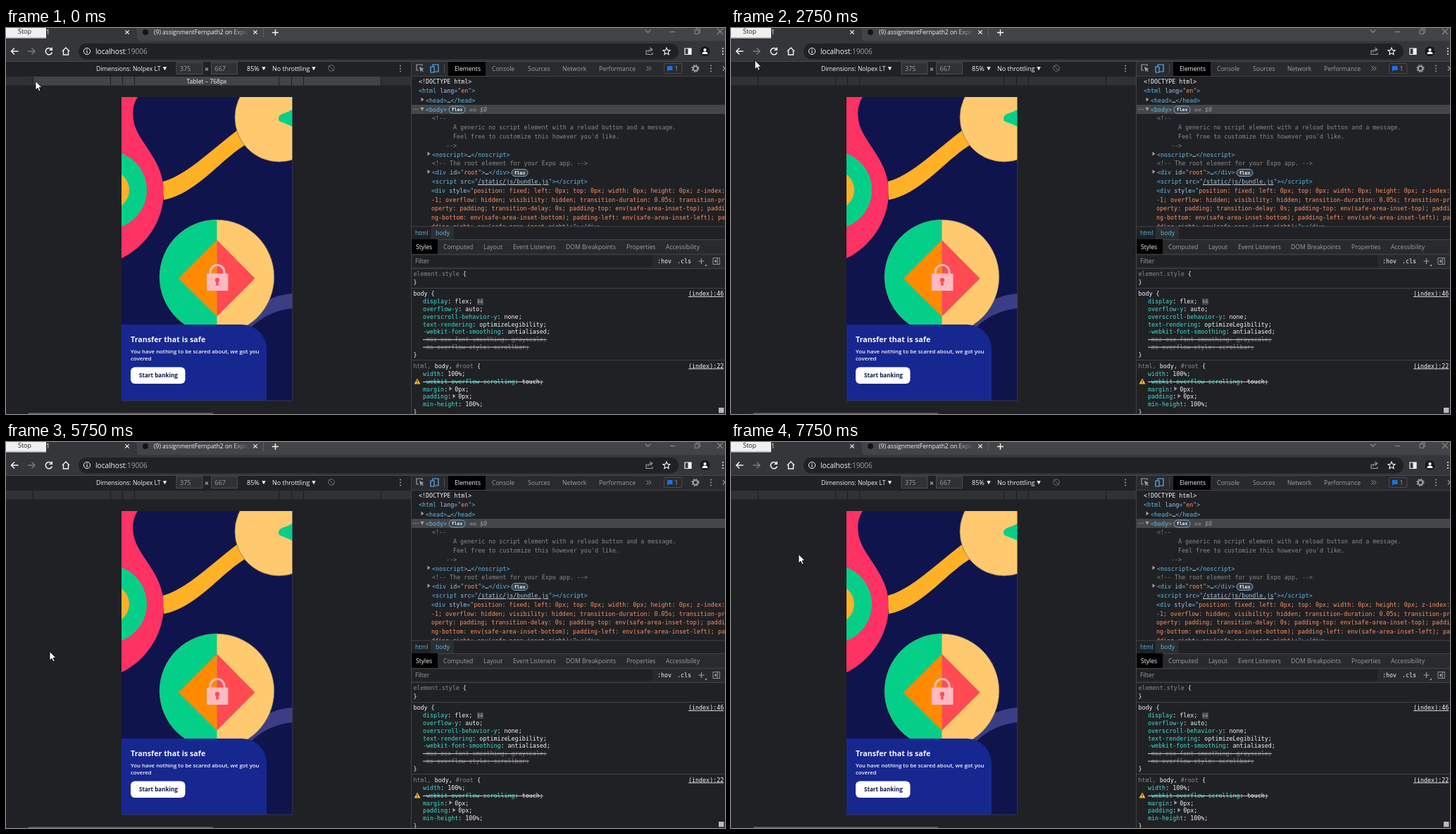
An HTML page for the animation above (8000 ms loop, 1021 by 548 pixels).

```html
<!DOCTYPE html>
<html lang="en">
<head>
<meta charset="utf-8">
<title>Device preview</title>
<style>
html, body { margin: 0; width: 100%; height: 100%; overflow: hidden; background: #202124; }
svg { display: block; width: 1021px; height: 548px; }
text { white-space: pre; font-family: "Open Sans", "Noto Sans", sans-serif; }
text.m { font-family: "DejaVu Sans Mono", monospace; }
</style>
</head>
<body>
<svg id="stage" viewBox="0 0 1021 548"></svg>
<script>
const out = [];
const ink = {
  w: '#f4f5f7', g: '#9aa0a6', t: '#5fb8e6', a: '#9bc4ec', v: '#fb8f5f',
  c: '#898989', p: '#3fdcd4', d: '#777777', b: '#10144d', k: '#202124'
};
const strip = '#434448';
const esc = s => s.replace(/&/g, '&amp;').replace(/\x3c/g, '&lt;');
const add = s => out.push(s);
const rect = (x, y, w, h, fill, extra = '') =>
  add(`<rect x="${x}" y="${y}" width="${w}" height="${h}" fill="${fill}" ${extra}/>`);
const disc = (x, y, r, fill, extra = '') =>
  add(`<circle cx="${x}" cy="${y}" r="${r}" fill="${fill}" ${extra}/>`);
const shape = (d, fill, extra = '') => add(`<path d="${d}" fill="${fill}" ${extra}/>`);
const line = (d, color = ink.w, w = 1.2, extra = '') =>
  shape(d, 'none', `stroke="${color}" stroke-width="${w}" ${extra}`);

// "~x" inside a string switches to colour x
function rich(x, y, s, size, extra) {
  const parts = s.split(/~(\w)/);
  let body = esc(parts[0]);
  for (let i = 1; i < parts.length; i += 2)
    body += `<tspan fill="${ink[parts[i]]}">${esc(parts[i + 1])}</tspan>`;
  add(`<text x="${x}" y="${y}" font-size="${size}" fill="${ink.w}" ${extra}>${body}</text>`);
}
const ui = (x, y, s, size = 8.6, extra = '') => rich(x, y, s, size, extra);
const code = (x, y, s, extra = '') => rich(x, y + 3, s, 8.36, 'class="m" ' + extra);
const arrowDown = (x, y, c = ink.w, r = 2.7) => shape(`M${x - r} ${y - r * .8}h${2 * r}l${-r} ${r * 1.8}z`, c);
const arrowRight = (x, y) => shape(`M${x - 1.5} ${y - 3}l4 3l-4 3z`, ink.g);
const dots = (x, y, c = ink.w) => [-4, 0, 4].forEach(d => disc(x, y + d, 1, c));
const cross = (x, y, r, c) => line(`M${x - r} ${y - r}l${2 * r} ${2 * r}m0 ${-2 * r}l${-2 * r} ${2 * r}`, c);

function browserBar() {
  rect(0, 0, 1021, 19, strip);
  shape('M0 0H181Q186 0 186 5V13Q186 19 192 19H0z', '#35363a');
  rect(0, 18.5, 1021, 29, '#35363a');
  rect(0, 47, 1021, 1, '#48494c');
  ui(57, 9, '1', 9);
  rect(0, 0, 57, 14.5, '#f0f0f0');
  rect(0, 13.5, 57, 1, '#a0a0a0');
  ui(17, 8, '~kStop', 9);
  cross(172, 6, 2.7, ink.w);
  disc(198, 6, 4, '#11131c');
  ui(210, 9, '(9) assignmentFernpath2 on Expo', 8.5);
  rect(320, 0, 26, 14, 'url(#fade)');
  rect(343, 0, 5, 14, strip);
  cross(354, 6, 2.7, ink.w);
  rect(365, 0, 1, 13, '#5d5e62');
  line('M378 6.5h9M382.5 2v9', ink.w, 1.4);
  const dim = '#8a8b8e';
  line('M907.5 2.5l4 4l4-4', dim);
  line('M943 5.5h7', dim);
  line('M978 3h5.5v5.5h-5.5zM980 3v-2h5.5v5.5h-2', dim, 1);
  cross(1014, 5, 4, dim);

  line('M17.5 33h-10m4.5-4.5l-4.5 4.5l4.5 4.5', ink.w, 1.5);
  line('M31 33h10m-4.5-4.5l4.5 4.5l-4.5 4.5', '#7c7d80', 1.4);
  line('M64.5 30a4.7 4.7 0 1 0 1 4.5', ink.w, 1.5);
  shape('M66 27v5h-5z', ink.w);
  line('M80 33l5-5l5 5M81.5 32v6h7v-6', ink.w, 1.4);
  rect(103, 22, 852, 22.5, '#202124', 'id="omni" rx="11.2"');
  disc(115, 33, 4.6, 'none', `stroke="${ink.w}"`);
  line('M115 32.3v3.5M115 30v1.2');
  ui(127, 36.7, 'localhost~g:19006', 10.1);
  line('M911.5 32h-2.5v5.5h9v-2.5M911.5 34.5q1-4 5-4m-2-2.5l3.5 2.5l-3.5 2.7', ink.g, 1.1);
  line('M938 28l1.4 3.4l3.6.3l-2.7 2.4l.8 3.6l-3.1-1.9l-3.1 1.9l.8-3.6l-2.7-2.4l3.6-.3z', ink.w, 1.1);
  line('M964 29h9v8.5h-9z', ink.w, 1.2);
  rect(968.5, 29, 4.5, 8.5, ink.w);
  disc(992.5, 33, 7, '#18191c');
  disc(992.5, 31, 2.1, '#fff');
  shape('M988.5 37q0-3.5 4-3.5t4 3.5z', '#fff');
  dots(1018, 33);
}

function deviceBar() {
  rect(0, 48, 575, 500, '#202124');
  ui(128, 60.5, 'Dimensions: Nolpex LT');
  arrowDown(225.5, 57.5);
  for (const [x, s] of [[242, '375'], [291.5, '667']]) {
    rect(x, 49, 37, 16.5, '#303134', 'stroke="#56575a" stroke-width=".8"');
    ui(x + 5, 60.5, '~g' + s, 9);
  }
  cross(285, 58.5, 2, ink.g);
  ui(342, 60.5, '85%', 9);
  arrowDown(366, 57.5);
  ui(378, 60.5, 'No throttling', 9);
  arrowDown(437, 57.5);
  disc(462, 57, 4.3, 'none', 'stroke="#77797d" stroke-width=".9"');
  line('M458.5 53.5l7 7', '#77797d', .9);
  dots(560, 57.5, ink.g);

  rect(0, 69, 575, 12.5, '#303134');
  add('<g id="tablet">');
  rect(39, 69, 493, 12.5, '#434447');
  ui(285, 78.5, 'Tablet – 768px', 8.6, 'text-anchor="middle"');
  add('</g>');
  for (const x of [38, 148, 165, 182, 387, 405, 422, 532]) rect(x, 69, 1, 12.5, '#1b1c1e');
  rect(32, 546.5, 262, 1.5, '#67686b');
}

function phone() {
  add('<g clip-path="url(#screen)">');
  rect(164, 98, 243, 431, '#10144d');
  shape('M164 98H187C180 108 178 123 183 139C192 166 224 190 224 232C224 276 196 312 164 327z', '#ff3264');
  disc(144.4, 230, 55.6, '#04cf89');
  disc(147.5, 230, 27.5, '#ffb128');
  shape('M223 218C258 208 290 174 330 144L341 165C302 189 272 234 224 244z', '#ffb128');
  disc(388, 127, 63, '#ffca6f', 'stroke="#8d7658" stroke-width=".8"');
  shape('M407 115.5Q400 120 392 122Q387 124 387 128.5Q387 133 393 134L407 140z', '#04cf89');
  shape('M407 377C378 379 361 391 342 409V428L348 425C366 408 385 400 407 398z', '#3b3e85');
  disc(299.5, 353.5, 81.3, '#ffca6f', 'stroke="#6f6655" stroke-width=".8"');
  shape('M299.5 272.2a81.3 81.3 0 0 0 0 162.6z', '#04cf89');
  shape('M299.5 301V409.5L245 355.5z', '#ff8a00');
  shape('M299.5 301V409.5L353.5 355.5z', '#ff4b51');
  line('M290 350v-3.5a10 10 0 0 1 20 0v3.5', '#ffbac1', 3);
  rect(285, 348.5, 30.5, 24.5, '#ffbac1', 'rx="1.5"');
  disc(300, 358, 3.2, '#ff4b51');
  shape('M299 358h2l1 7.5h-4z', '#ff4b51');
  shape('M164 421H335A35 35 0 0 1 370 456V529H164z', '#172790');
  ui(177, 446, 'Transfer that is safe', 10.7, 'font-weight="700"');
  ui(177, 462, 'You have nothing to be scared about, we got you', 7.8, 'font-weight="600"');
  ui(177, 472.3, 'covered', 7.8, 'font-weight="600"');
  rect(177, 481.5, 77.5, 23.5, '#fff', 'rx="6"');
  ui(189, 496.2, '~bStart banking', 8.1, 'font-weight="700"');
  add('</g>');
  line('M406.7 98V529H164', '#3c3d55', .8);
}

function badge(x, y) {
  rect(x, y - 5, 23, 10, '#37434c', 'rx="5" stroke="#9dbbdb" stroke-width=".8"');
  rich(x + 11.5, y + 2.3, 'flex', 6.6, 'class="m" font-weight="700" text-anchor="middle"');
}

function elementsPanel() {
  rect(575, 48, 446, 500, '#202124');
  rect(576, 48, 445, 20, '#292a2d');
  rect(576, 68, 445, .8, '#494c50');
  line('M591 54v-2h-8v8h3', ink.g);
  shape('M587 55l6.5 3l-2.8 1l2 2.3l-1 1l-2-2.3l-1 2.5z', ink.g);
  line('M606 55v-3h8v10h-5M603 55h5v8h-5z', '#5ab3ff');
  rect(622, 51, .8, 13, '#55565a');
  rect(628, 48, 53, 20, '#000');
  [[637, '~wElements'], [690, 'Console'], [741, 'Sources'], [790, 'Network'], [842, 'Performance']]
    .forEach(([x, s]) => ui(x, 60.6, '~g' + s));
  line('M909.5 54.5l3 3l-3 3m3.5-6l3 3l-3 3', ink.g, 1);
  rect(934.5, 50.5, 25.5, 14, 'none', 'rx="2" stroke="#4a4b4f"');
  shape('M939 54h7.5v6h-5.5l-2 2z', '#1a73e8');
  ui(949.5, 60.6, '~g1');
  disc(979, 57.5, 3.2, 'none', `stroke="${ink.g}" stroke-width="2"`);
  disc(979, 57.5, 4.8, 'none', `stroke="${ink.g}" stroke-width="1.5" stroke-dasharray="2 1.77"`);
  dots(1001, 57.5, ink.g);
  cross(1021, 57.5, 3, ink.g);

  rect(576, 109, 445, 13, '#454648');
  code(586, 76, '\x3c!DOCTYPE html>');
  code(586, 89, '~t<html ~alang~t="~ven~t">');
  arrowRight(591, 101.5);
  code(596, 102.5, '~t<head>~w…~t</head>');
  [579, 582, 585].forEach(x => disc(x, 115.5, .7, ink.g));
  arrowDown(591, 115, ink.g);
  code(596, 115.5, '~t<body>');
  badge(629, 116);
  code(658, 115.5, '~g== $0', 'font-style="italic"');
  code(605, 128, '~c\x3c!--');
  code(635, 141, '~cA generic no script element with a reload button and a message.');
  code(635, 154, '~cFeel free to customize this however you\'d like.');
  code(625, 166.5, '~c-->');
  arrowRight(600, 178.5);
  code(605, 179.5, '~t<noscript>~w…~t</noscript>');
  code(605, 192, '~c\x3c!-- The root element for your Expo app. -->');
  arrowRight(600, 204);
  code(605, 205, '~t<div ~aid~t="~vroot~t">~w…~t</div>');
  badge(718, 205.5);
  code(605, 218, '~t\x3cscript ~asrc~t="');
  code(670, 218, '~a/static/js/bundle.js', 'text-decoration="underline"');
  code(770.5, 218, '~t">\x3c/script>');
  ['~t<div ~astyle~t="~vposition: fixed; left: 0px; top: 0px; width: 0px; height: 0px; z-index:',
    '~v-1; overflow: hidden; visibility: hidden; transition-duration: 0.05s; transition-pr',
    '~voperty: padding; transition-delay: 0s; padding-top: env(safe-area-inset-top); paddi',
    '~vng-bottom: env(safe-area-inset-bottom); padding-left: env(safe-area-inset-left); pa',
    '~vdding-right: env(safe-area-inset-right);~t"></div>'
  ].forEach((s, i) => code(604, 231 + i * 12.7, s));

  rect(576, 281.5, 445, 19, '#202124');
  rect(576, 281.5, 445, .8, '#494c50');
  rect(603, 282.5, 33, 17.5, '#2c2e31');
  ui(581, 294, '~thtml');
  ui(610, 294, '~tbody');
}

function stylesPanel() {
  rect(576, 300, 445, 21, '#292a2d');
  rect(576, 300, 445, .8, '#494c50');
  rect(576, 300, 37, 21, '#000');
  [[582, '~wStyles'], [621, 'Computed'], [678, 'Layout'], [720, 'Event Listeners'],
    [795, 'DOM Breakpoints'], [881, 'Properties'], [937, 'Accessibility']]
    .forEach(([x, s]) => ui(x, 314, '~g' + s));
  rect(576, 321, 445, 20.5, '#292a2d');
  rect(577, 323, 341, 16, '#202124');
  rect(576, 320.8, 445, .8, '#494c50');
  rect(576, 341, 445, .8, '#494c50');
  ui(581, 334.2, '~gFilter');
  code(925, 331, ':hov');
  code(953, 331, '.cls');
  line('M983.5 331h8M987.5 327v8', ink.g);
  shape('M995 338v-3l-3 3z', ink.g);
  line('M1004 326.5h9.5v9h-9.5zM1010.5 326.5v9', ink.g, .9);
  shape('M1009 328.5v5l-3.5-2.5z', ink.g);

  code(578.5, 349, '~celement.style ~w{');
  code(578.5, 361, '}');
  rect(576, 369, 445, .8, '#494c50');
  code(578.5, 377, 'body {');
  code(969, 377, '(index):46', 'text-decoration="underline"');
  const props = ['display~w: flex;', 'overflow-y~w: auto;', 'overscroll-behavior-y~w: none;',
    'text-rendering~w: optimizeLegibility;', '-webkit-font-smoothing~w: antialiased;'];
  props.forEach((s, i) => code(592, 388.3 + i * 10.75, '~p' + s));
  rect(669, 384, 9, 9, '#46474a');
  line('M671 385.5v6M675.5 385.5v6M670 388.5h7', ink.g, 1.2, 'stroke-dasharray="2 1"');
  code(592, 442, '~d-moz-osx-font-smoothing: grayscale;', 'text-decoration="line-through"');
  code(592, 452.8, '~d-ms-overflow-style: scrollbar;', 'text-decoration="line-through"');
  code(578.5, 463.5, '}');
  rect(576, 471, 445, .8, '#494c50');
  code(578.5, 479.5, '~chtml, ~wbody, ~c#root ~w{');
  code(969, 479.5, '(index):22', 'text-decoration="underline"');
  code(592, 491, '~pwidth~w: 100%;');
  shape('M584 497.5l4.5 8h-9z', '#f5bd2d');
  line('M584 500v3M584 503.7v1', '#202124', 1);
  code(592, 502, '~p-webkit-overflow-scrolling~w: touch;', 'text-decoration="line-through"');
  code(592, 512.5, '~pmargin~w:  0px;');
  arrowRight(631, 512);
  code(592, 523, '~ppadding~w:  0px;');
  arrowRight(636, 522.5);
  code(592, 533.8, '~pmin-height~w: 100%;');
  code(578.5, 544.5, '}');
  rect(1012, 539, 7.5, 7.5, '#b9babd');
  rect(575, 48, .8, 500, '#494c50');
}

function pointers() {
  add('<g id="arrow">');
  shape('M0 0V12.5L3 9.8L4.9 14.2L7 13.3L5.1 9H9z', '#fff', 'stroke="#000" stroke-width=".8"');
  add('</g><g id="beam">');
  line('M-2.5-6h5M0-6v12M-2.5 6h5', '#e8eaed', 1);
  add('</g><g id="touch">');
  disc(0, 0, 11.6, '#050505', 'stroke="#4b4c50" stroke-width=".8"');
  add('</g>');
}

add(`<defs><clipPath id="screen"><rect x="164" y="98" width="243" height="431"/></clipPath>
<linearGradient id="fade"><stop offset="0" stop-color="${strip}" stop-opacity="0"/>
<stop offset="1" stop-color="${strip}"/></linearGradient></defs>`);
[browserBar, deviceBar, phone, elementsPanel, stylesPanel, pointers].forEach(draw => draw());
document.getElementById('stage').innerHTML = out.join('');

// pointer place for every 250 ms: x, y, kind (arrow when left out)
const STEP = 250;
const path = [
  [42, 75.5], [42, 79], [56, 79], [104, 76], [150, 68], [177, 64],
  [184, 61.5], [199, 57], [160, 53], [110, 50], [60, 48],
  [34, 46], [64, 51], [130, 57], [172, 40, 'beam'], [190, 38, 'beam'],
  [195, 39, 'beam'], [82, 150], [14, 272.5], [22, 360], [62, 418],
  [84, 435], [77, 372], [62, 297.5], [62, 297.5],
  [101, 198], [101, 198], [172, 340, 'touch'], [190, 450, 'touch'],
  [182, 520, 'touch'], [128, 330], [96, 159.5]
];
const el = id => document.getElementById(id);
const kinds = ['arrow', 'beam', 'touch'];
const start = performance.now();

function show(now) {
  const t = Math.max(0, now - start) % (path.length * STEP);
  const [x, y, kind = 'arrow'] = path[Math.floor(t / STEP)];
  for (const k of kinds) {
    el(k).setAttribute('transform', `translate(${x} ${y})`);
    el(k).setAttribute('visibility', k === kind ? 'visible' : 'hidden');
  }
  el('tablet').setAttribute('visibility', y > 69 && y < 82 && x > 38 ? 'visible' : 'hidden');
  el('omni').setAttribute('fill', kind === 'beam' ? '#292a2d' : '#202124');
  requestAnimationFrame(show);
}
show(start);
</script>
</body>
</html>
```
